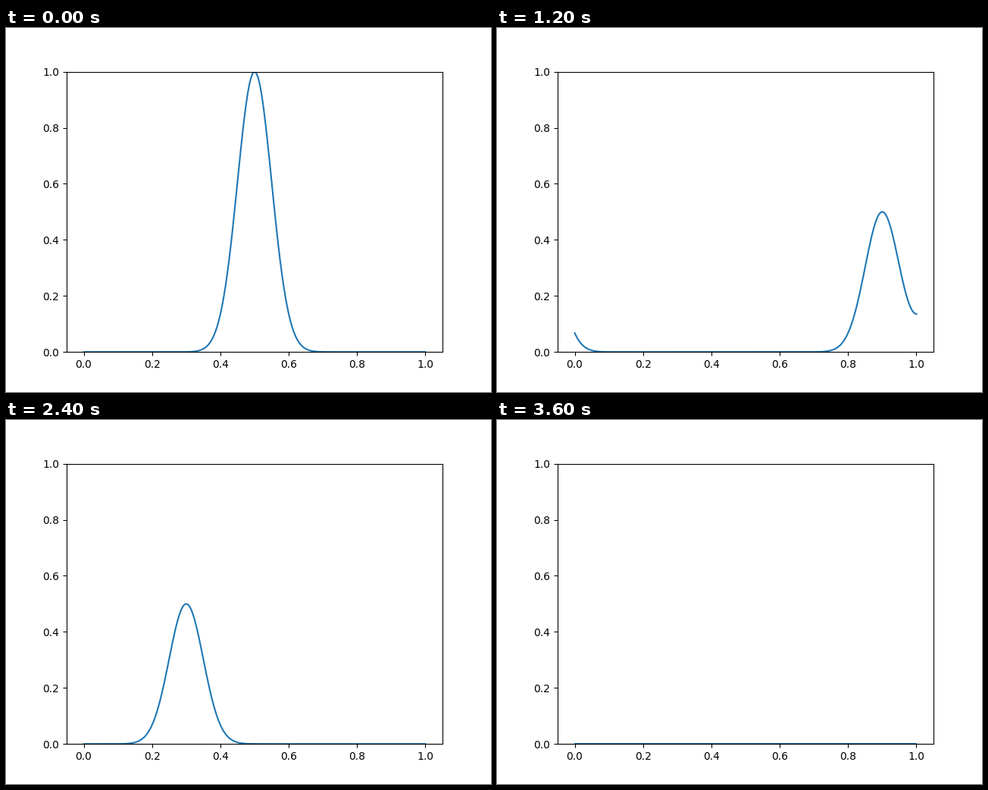
A matplotlib script that plays this animation: 640x480 px, repeating every 8 s.

```python
import matplotlib.pyplot as plt
import numpy as np
from matplotlib.animation import FuncAnimation

FRAMES = 40
INTERVAL = 200      # ms
SPEED = 0.1         # distance travelled per frame
START = 0.5
WIDTH = 0.05

x = np.linspace(0, 1, 201)


def pulse(center):
    return 0.5 * np.exp(-0.5 * ((x - center) / WIDTH) ** 2)


def wave(frame):
    """Split pulse: the left end absorbs, the right end reflects upright."""
    travel = SPEED * frame
    left = pulse(START - travel)
    right = pulse(START + travel)
    reflected = pulse(2 - START - travel)
    return left + right + reflected


fig, ax = plt.subplots(figsize=(6.4, 4.8), dpi=100)
line, = ax.plot(x, wave(0))
ax.set_ylim(0, 1)


def update(frame):
    line.set_ydata(wave(frame))
    return line,


anim = FuncAnimation(fig, update, frames=FRAMES, interval=INTERVAL,
                     repeat=True, repeat_delay=0, blit=False)
plt.show()
```
